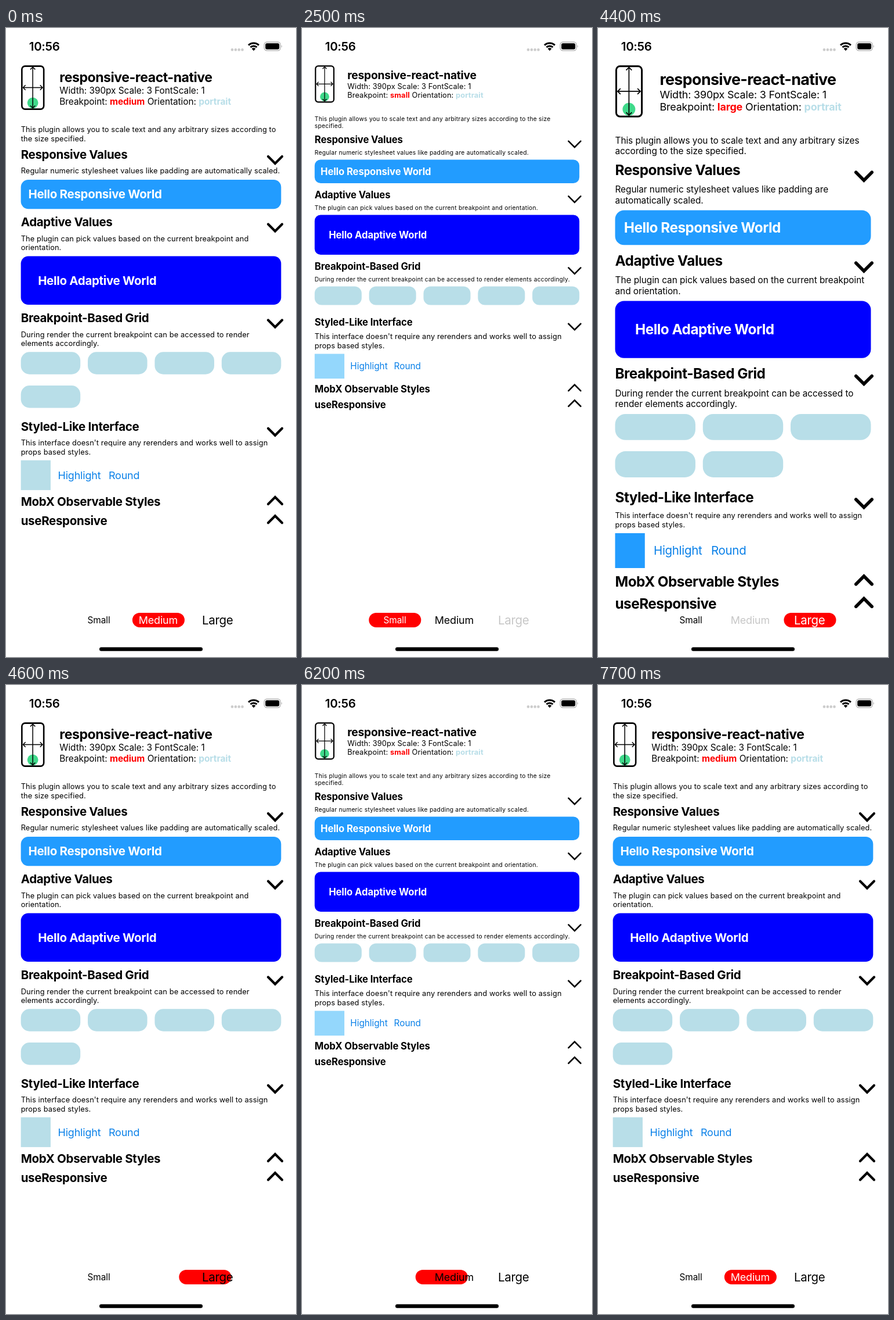
An HTML page that plays this animation: 500x1082 px, repeating every 8000 ms.

```html
<!DOCTYPE html>
<html lang="en">
<head>
<meta charset="utf-8">
<title>Responsive layout demo</title>
<style>
  html, body { margin: 0; width: 100%; height: 100%; overflow: hidden; background: #fff; }
  svg { display: block; width: 100vw; height: 100vh; }
  text { font-family: Inter, Roboto, sans-serif; white-space: pre; }
</style>
</head>
<body>
<svg id="stage" viewBox="0 0 500 1082">
  <g id="status">
    <g fill="#ccc">
      <circle cx="390" cy="37.4" r="2.3"/><circle cx="395.9" cy="37.4" r="2.3"/>
      <circle cx="401.7" cy="37.4" r="2.3"/><circle cx="407.5" cy="37.4" r="2.3"/>
    </g>
    <g fill="none" stroke="#000" stroke-width="3.1">
      <path d="M418.1 29.7A12.6 12.6 0 0 1 435.9 29.7"/>
      <path d="M421.5 33.2A7.8 7.8 0 0 1 432.5 33.2"/>
    </g>
    <path d="M427 39.2L423.6 35.6A4.9 4.9 0 0 1 430.4 35.6Z"/>
    <rect x="445.2" y="24.2" width="28" height="14.6" rx="4.6" fill="none" stroke="#a6a6a6" stroke-width="1.2"/>
    <rect x="447.2" y="26.2" width="24" height="10.6" rx="2.8"/>
    <path d="M474.8 29.2Q476.8 31.5 474.8 33.8Z" fill="#a6a6a6"/>
  </g>
  <g id="pages"></g>
  <rect id="pill" y="1005.9" width="90" height="25" rx="12.5" fill="#f00"/>
  <g id="tabs"></g>
  <rect x="161" y="1065.3" width="178" height="6.4" rx="3.2"/>
</svg>
<script>
const PT = 500 / 390;
const LOOP = 8000, STEP = 100;
const PALE = '#b8dee8', SKY = '#94d7fc', DODGER = '#229cff', LINK = '#0a80e8';
const byId = id => document.getElementById(id);

function add(parent, tag, attrs, content = '') {
  const node = document.createElementNS('http://www.w3.org/2000/svg', tag);
  for (const key in attrs) node.setAttribute(key, attrs[key]);
  node.textContent = content;
  parent.append(node);
  return node;
}

// y is the middle of the capitals; tracking tightens as the type grows.
function label(parent, str, x, y, pt, { weight = 400, fill = '#000', anchor = 'start' } = {}) {
  const size = pt * PT;
  const tracking = 0.64 / pt - 0.0555;
  return add(parent, 'text', {
    x, y: y + size * 0.36, fill, 'font-size': size, 'font-weight': weight,
    'letter-spacing': tracking * size, 'text-anchor': anchor
  }, str);
}

function paragraph(parent, str, breakAt, x, y, pt) {
  const lines = breakAt ? str.replace(' ' + breakAt, '\n' + breakAt).split('\n') : [str];
  lines.forEach((line, i) => label(parent, line, x, y + i * pt * PT * 1.2, pt));
}

function box(parent, x, y, width, height, rx, fill) {
  add(parent, 'rect', { x, y, width, height, rx, fill });
}

const intro = 'This plugin allows you to scale text and any arbitrary sizes according to the size specified.';
const sections = [
  ['Responsive Values', 'Regular numeric stylesheet values like padding are automatically scaled.'],
  ['Adaptive Values', 'The plugin can pick values based on the current breakpoint and orientation.'],
  ['Breakpoint-Based Grid', 'During render the current breakpoint can be accessed to render elements accordingly.'],
  ['Styled-Like Interface', "This interface doesn't require any rerenders and works well to assign props based styles."],
  ['MobX Observable Styles'],
  ['useResponsive']
];

const layouts = [
  {
    name: 'small', icon: 0.837, header: [78.2, 81, 100, 115.5], intro: 156.3,
    heads: [191.8, 286.7, 409.7, 506, 621, 647.6],
    notes: [214, 309, 432, 530.5],
    tops: [226.5, 321.5, 444.5, 560.5],
    breaks: ['specified', '', '', '', 'props'],
    columns: 5, square: SKY, links: [83.3, 158.6],
    chevron: { x: 470, reach: 10.5, drop: 8, stroke: 2.6 }
  },
  {
    name: 'medium', icon: 1, header: [92.3, 84.5, 107.5, 126], intro: 174.6,
    heads: [217.5, 334, 499, 685.3, 815, 847.4],
    notes: [245.5, 362, 527, 713.5],
    tops: [261, 392.5, 557.3, 743.6],
    breaks: ['the size', '', 'orientation', 'elements', 'props'],
    columns: 4, square: PALE, links: [89.5, 177],
    chevron: { x: 464, reach: 12, drop: 9.5, stroke: 4.2 }
  },
  {
    name: 'large', icon: 1.168, header: [106.4, 88, 114.5, 136], intro: 193.2,
    heads: [244.3, 400.3, 594.7, 807, 952, 990.4],
    notes: [277.5, 433.5, 628, 838.6],
    tops: [313.5, 469.5, 664, 869],
    breaks: ['according', 'automatically', 'and orientation', 'render elements', 'props'],
    columns: 3, square: DODGER, links: [96, 195],
    chevron: { x: 458.5, reach: 13.7, drop: 10.8, stroke: 5.6 }
  }
];

function drawIcon(parent, x, scale) {
  const icon = add(parent, 'g', { transform: `translate(${x} 64.2) scale(${scale})` });
  add(icon, 'circle', { cx: 20.2, cy: 64.6, r: 9.4, fill: '#3fd98a' });
  add(icon, 'rect', {
    x: 1.4, y: 1.4, width: 37.8, height: 74, rx: 5.5, fill: 'none', stroke: '#000', 'stroke-width': 2.6
  });
  add(icon, 'path', {
    d: 'M20.2 3V73.5M16 7.2L20.2 3L24.4 7.2M16 69.3L20.2 73.5L24.4 69.3' +
       'M3.5 38.3H37M7.7 34.1L3.5 38.3L7.7 42.5M32.8 34.1L37 38.3L32.8 42.5',
    fill: 'none', stroke: '#000', 'stroke-width': 1.5
  });
}

function drawChevron(parent, { x, reach, drop, stroke }, headY, open) {
  const dir = open ? 1 : -1;
  const y = headY + (open ? drop : -2.1);
  const h = reach / 2 * dir;
  add(parent, 'path', {
    d: `M${x - reach} ${y - h}L${x} ${y + h}L${x + reach} ${y - h}`,
    fill: 'none', stroke: '#000', 'stroke-width': stroke, 'stroke-linecap': 'round'
  });
}

function drawPage(layout, k) {
  const page = add(byId('pages'), 'g', {});
  const left = (17 + 3 * k) * PT, width = 500 - 2 * left;
  const body = 8 + 2 * k, info = 10 + 2 * k, head = 13 + 3 * k;
  const { header: [hx, titleY, sizeY, modeY], heads, notes, tops, breaks } = layout;

  drawIcon(page, left + 0.3, layout.icon);
  label(page, 'responsive-react-native', hx, titleY, 15 + 3 * k, { weight: 700 });
  label(page, 'Width: 390px Scale: 3 FontScale: 1', hx, sizeY, info);
  const mode = label(page, 'Breakpoint: ', hx, modeY, info);
  add(mode, 'tspan', { fill: '#f00', 'font-weight': 700 }, layout.name);
  add(mode, 'tspan', {}, ' Orientation: ');
  add(mode, 'tspan', { fill: PALE, 'font-weight': 700 }, 'portrait');
  paragraph(page, intro, breaks[0], left, layout.intro, body);

  sections.forEach(([title, note], i) => {
    label(page, title, left, heads[i], head, { weight: 700 });
    drawChevron(page, layout.chevron, heads[i], !!note);
    if (note) paragraph(page, note, breaks[i + 1], left, notes[i], i === 3 ? 10 : body);
  });

  [['Hello Responsive World', body, DODGER], ['Hello Adaptive World', 19 + 4 * k, '#00f']]
    .forEach(([str, pad, fill], i) => {
      const height = (head * 1.194 + 2 * pad) * PT;
      box(page, left, tops[i], width, height, body * PT, fill);
      label(page, str, left + pad * PT, tops[i] + height / 2, head, { weight: 700, fill: '#fff' });
    });

  const gap = 10 * PT, cols = layout.columns;
  const cellW = (width - gap * (cols - 1)) / cols, cellH = (25 + 5 * k) * PT;
  for (let i = 0; i < 5; i++) {
    const row = Math.floor(i / cols);
    box(page, left + (i % cols) * (cellW + gap), tops[2] + row * (cellH + 15 * PT),
        cellW, cellH, 12 + 3 * k, PALE);
  }

  const squareH = 42.6 + 8.7 * k;
  box(page, left, tops[3], 40 * PT, squareH, 0, layout.square);
  ['Highlight', 'Round'].forEach((str, i) =>
    label(page, str, layout.links[i], tops[3] + squareH / 2, 12 + 2 * k, { fill: LINK }));
  return page;
}

label(byId('status'), '10:56', 39.8, 32, 16, { weight: 600 });
const pages = layouts.map(drawPage);
const tabs = ['Small', 'Medium', 'Large'].map((str, i) =>
  label(byId('tabs'), str, 160 + 102.4 * i, 1018.6, 12 + 2 * i, { anchor: 'middle' }));

// Each tap dims a tab, then switches the layout while the pill glides over.
const taps = [
  { press: 500, at: 700, to: 0, lead: 50 },
  { press: 2500, at: 2700, to: 2, lead: 120 },
  { press: 4400, at: 4600, to: 1, lead: 120 },
  { press: 6000, at: 6200, to: 0, lead: 120, soft: true },
  { press: 7200, at: 7400, to: 1, lead: 120, soft: true }
];

function ease(p) {
  p = Math.min(Math.max(p, 0), 1);
  return p < 0.5 ? 2 * p * p : 1 - 2 * (1 - p) ** 2;
}

function render(ms) {
  const t = Math.floor((ms % LOOP) / STEP) * STEP;
  let active = 1, pill = 1, dimmed = -1, dim = 1;
  for (const { press, at, to, lead, soft } of taps) {
    if (t >= at) {
      pill = active + (to - active) * ease((t - at + lead) / 365);
      active = to;
    } else if (t >= press) {
      dimmed = to;
      dim = soft ? (t === press ? 0.6 : 0.29) : 0.22;
    }
  }
  pages.forEach((page, i) => page.setAttribute('display', i === active ? 'inline' : 'none'));
  tabs.forEach((tab, i) => {
    tab.setAttribute('fill', i === active ? '#fff' : '#000');
    tab.setAttribute('opacity', i === dimmed ? dim : 1);
  });
  byId('pill').setAttribute('x', 115.3 + 102.6 * pill);
}

const start = performance.now();
function tick() {
  render(performance.now() - start);
  requestAnimationFrame(tick);
}
tick();
</script>
</body>
</html>
```
